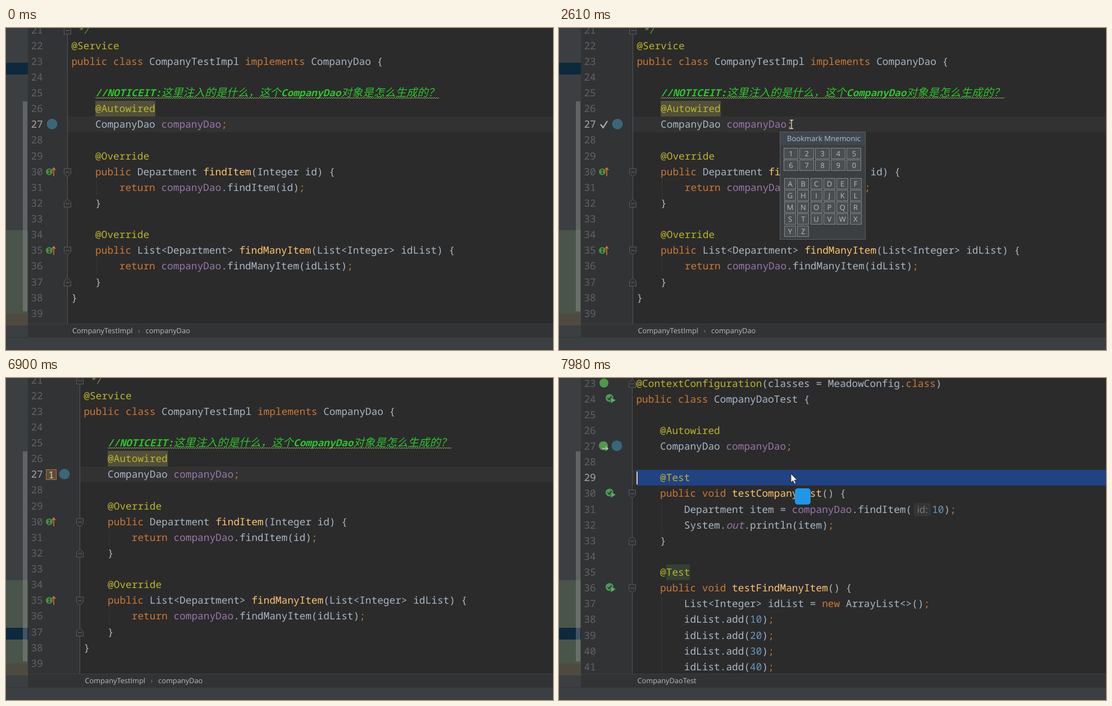
Write an HTML page that moves like this. It is 974 px wide and 575 px high and loops after 8 s.

```html
<!DOCTYPE html>
<html lang="zh">
<head>
<meta charset="utf-8">
<title>Editor bookmark</title>
<style>
html, body { margin: 0; width: 100%; height: 100%; overflow: hidden; background: #3c3f41; }
#stage { position: absolute; left: 0; top: 0; width: 974px; height: 575px; overflow: hidden; background: #3c3f41; text-rendering: geometricPrecision; }
#stage div, #stage svg { position: absolute; }
svg { left: 0; top: 0; overflow: visible; }
.file { left: 39px; top: 0; width: 935px; height: 528px; background: #2b2b2b; overflow: hidden; }
.origin { left: -39px; top: 0; width: 974px; height: 528px; }
.gutter { left: 39px; top: 0; height: 528px; background: #313335; border-right: 1px solid #555; }
.line, .num { height: 28px; white-space: pre; font: 17.8px/28px "Noto Sans Mono", monospace; color: #a9b7c6; }
.line { left: 116.4px; }
.num { left: 44.4px; color: #606366; }
.num.now { color: #a9a8a8; }
.row { left: 110px; width: 900px; height: 28px; background: #323232; }
.guide { width: 1px; background: #373737; }
.k { color: #cc7832; } .a { color: #bbb529; } .f { color: #9876aa; } .m { color: #ffc66d; } .n { color: #6897bb; }
.w { color: #bbb529; background: #52503a; display: inline-block; height: 28px; }
.t { color: #bbb529; background: #344134; display: inline-block; height: 28px; }
.selected .t { background: none; }
.d { color: #629755; font-style: italic; }
.o { color: #9876aa; font-style: italic; }
.c { color: #2bc52b; font-style: italic; font-weight: 600; }
.z { color: #2bc52b; font: italic 300 19.4px/20px "Noto Sans CJK SC", "Noto Sans CJK", sans-serif; }
.h { display: inline-block; box-sizing: border-box; width: 30px; height: 24px; margin: 2px 2px 2px 4px; vertical-align: top; border-radius: 4px; background: #343536; color: #7d7d7d; font: 17px/23px "Open Sans", sans-serif; text-align: center; }
.ui { white-space: pre; color: #bbb; font-family: "Open Sans", sans-serif; }
.caret { width: 2px; height: 23px; background: #d0d0d0; }
#crumbs { left: 39px; top: 528px; width: 935px; height: 24px; box-sizing: border-box; background: #313335; border-top: 1px solid #3e4042; }
#crumb { top: 528px; font-size: 12.8px; line-height: 24px; }
#crumb i { font-style: normal; color: #808080; margin: 0 9.6px; }
#popup { left: 393px; top: 185px; width: 151px; height: 191px; background: #3c3f41; border: 1px solid #5b5e60; }
#popup .title { left: 0; top: 0; width: 151px; height: 23px; background: #3d474f; text-indent: 4px; font-size: 13.1px; line-height: 22px; text-align: center; }
.key { box-sizing: border-box; height: 20px; border: 1px solid #85888a; background: #4a4e50; text-align: center; font-size: 13px; line-height: 18px; }
#badge { left: 71px; top: 163px; width: 17px; height: 17px; border: 1px solid #a27a4c; background: #614a33; color: #d0d0d0; font: 17px/17px "Noto Sans Mono", monospace; text-align: center; }
#lookup { left: 420px; top: 197px; width: 28px; height: 29px; border-radius: 5px; background: #2196e8; }
</style>
</head>
<body>
<div id="stage"></div>
<script>
const LOOP = 8000, PITCH = 28.13;
const stage = document.getElementById('stage');

function add(parent, cls, style = {}, html = '') {
  const el = document.createElement('div');
  el.className = cls;
  for (const [k, v] of Object.entries(style)) el.style[k] = typeof v === 'number' ? v + 'px' : v;
  el.innerHTML = html;
  parent.append(el);
  return el;
}
const svg = (parent, body) => add(parent, '', { left: 0, top: 0 }, `<svg width="1" height="1">${body}</svg>`);
const show = (el, on) => { el.style.display = on ? '' : 'none'; };

// «x text» gives the text the class x
const paint = s => s.replace(/</g, '&lt;').replace(/«(\w) (.*?)»/g, '<span class="$1">$2</span>');

const fold = (y, up) => `<path transform="translate(109.5 ${y}) scale(1 ${up ? -1 : 1})" d="M-6-6.5H6V2.5L0 8L-6 2.5Z" fill="#2f3133" stroke="#5c5e60"/><path d="M106.5 ${y}h6" stroke="#6a6c6e"/>`;
const dot = (x, y, r, color) => `<circle cx="${x}" cy="${y}" r="${r}" fill="${color}"/>`;
const implement = y => dot(77, y, 6, '#4a8f3c') +
  `<path d="M75 ${y - 3}h4m-2 0v6m-2 0h4" stroke="#233020" stroke-width="1.2" fill="none"/>` +
  `<path d="M85 ${y + 8}v-15m-3 4l3-4l3 4" stroke="#d9703f" stroke-width="1.6" fill="none"/>`;
const runTest = y => dot(90, y - 2, 7, '#4b9b57') +
  `<path d="M86.5 ${y - 2}l2.5 3l4.5-6" stroke="#313335" stroke-width="1.8" fill="none"/>` +
  `<path d="M92 ${y - 4}l9.5 6l-9.5 6z" fill="#5aae65" stroke="#313335"/>`;

function makeFile({ first, current, base, lines, folds, guides, shift, pinned }) {
  const root = add(stage, 'file');
  const origin = add(root, 'origin');
  const center = n => base + (n - current) * PITCH;
  const rowTop = Math.round(base) - 14;
  const gutter = add(origin, 'gutter');
  const layer = add(origin, '', { left: 0, top: 0, width: 974, height: 528 });
  add(layer, 'row', { top: rowTop });
  for (const [from, to] of guides)
    add(layer, 'guide', { left: 161, top: center(from) - 14, height: (to - from + 1) * PITCH });
  const selection = add(layer, 'row', { top: rowTop, left: 117, background: '#214283' });
  const rows = lines.map((text, i) => {
    const n = first + i, top = Math.round(center(n)) - 14;
    add(origin, n === current ? 'num now' : 'num', { top }, n);
    return add(layer, 'line', { top }, paint(text));
  });
  svg(layer, folds.map(n => fold(Math.round(center(Math.abs(n))) + .5, n < 0)).join(''));
  svg(origin, pinned(center));
  const caret = add(layer, 'caret', { top: rowTop + 3 });
  const setShift = s => {
    gutter.style.width = 70 + s + 'px';
    layer.style.transform = `translateX(${s}px)`;
  };
  setShift(shift);
  show(selection, false);
  return { root, layer, caret, selection, setShift, currentRow: rows[current - first] };
}

// Project strip
const strip = (top, height, color) => add(stage, '', { left: 0, top, width: 39, height, background: color });
strip(361, 149, '#49544a');
strip(510, 21, '#4f4a40');
const treeRow = strip(62, 21, '#0d293e');
add(stage, '', { left: 30, top: 131, width: 8, height: 375, background: 'rgba(166,166,166,.34)' });

const impl = makeFile({
  first: 21, current: 27, base: 172.3, shift: 0,
  folds: [-21, 30, -32, 35, -37], guides: [[31, 31], [36, 36]],
  pinned: y => implement(y(30)) + implement(y(35)),
  lines: [
    '«d  */»',
    '«a @Service»',
    '«k public class» CompanyTestImpl «k implements» CompanyDao {',
    '',
    '    «c //NOTICEIT:»«z 这里注入的是什么，这个»«c CompanyDao»«z 对象是怎么生成的？»',
    '    «w @Autowired»',
    '    CompanyDao «f companyDao»«k ;»',
    '',
    '    «a @Override»',
    '    «k public» Department «m findItem»(Integer id) {',
    '        «k return» «f companyDao».findItem(id)«k ;»',
    '    }',
    '',
    '    «a @Override»',
    '    «k public» List<Department> «m findManyItem»(List<Integer> idList) {',
    '        «k return» «f companyDao».findManyItem(idList)«k ;»',
    '    }',
    '}',
    ''
  ]
});
const wave = Array.from({ length: 307 }, (_, i) => `${159 + i * 2},${i % 2 ? 126 : 124}`).join(' ');
svg(impl.layer, dot(82, 171.5, 9.5, '#3a6678') + `<polyline points="${wave}" fill="none" stroke="#a39c68"/>`);
impl.caret.style.left = '393px';

const test = makeFile({
  first: 23, current: 29, base: 178.3, shift: 21,
  folds: [-23, 30, -33, 36], guides: [[31, 32], [37, 41]],
  pinned: y => dot(80, 9, 8, '#4f9a4a') + [24, 30, 36].map(n => runTest(y(n))).join('') +
    dot(79, 121, 8, '#4f9a4a') + '<path d="M77 126h10m-4-3.5l4 3.5l-4 3.5" stroke="#c4c8ca" stroke-width="1.6" fill="none"/>',
  lines: [
    '«a @ContextConfiguration»(classes = MeadowConfig.«k class»)',
    '«k public class» CompanyDaoTest {',
    '',
    '    «a @Autowired»',
    '    CompanyDao «f companyDao»«k ;»',
    '',
    '    «a @»«t Test»',
    '    «k public void» «m testCompanyTest»() {',
    '        Department item = «f companyDao».findItem(«h id:»«n 10»)«k ;»',
    '        System.«o out».println(item)«k ;»',
    '    }',
    '',
    '    «a @»«t Test»',
    '    «k public void» «m testFindManyItem»() {',
    '        List<Integer> idList = «k new» ArrayList<>()«k ;»',
    ...[10, 20, 30, 40].map(v => `        idList.add(«n ${v}»)«k ;»`)
  ]
});
svg(test.layer, dot(82, 121, 9.5, '#3a6678'));

// Breadcrumbs
add(stage, '').id = 'crumbs';
add(stage, '', { left: 0, top: 552, width: 974, height: 1, background: '#323435' });
const crumb = add(stage, 'ui');
crumb.id = 'crumb';
const trail = (...parts) => parts.join('<i>›</i>');

// Bookmark marks and popup
const check = svg(stage, '<path d="M74 172l4.5 6l7.5-12" fill="none" stroke="#afb1b3" stroke-width="2.2"/>');
const badge = add(stage, '', {}, '1');
badge.id = 'badge';
const popup = add(stage, '');
popup.id = 'popup';
add(popup, 'title ui', {}, 'Bookmark Mnemonic');
const keys = (chars, cols, left, top, width, dx) => [...chars].forEach((ch, i) =>
  add(popup, 'key ui', { left: left + i % cols * dx, top: top + Math.floor(i / cols) * 21.3, width }, ch));
keys('1234567890', 5, 6, 28, 26, 28.1);
keys('ABCDEFGHIJKLMNOPQRSTUVWXYZ', 6, 7, 81.5, 21, 23.3);
const lookup = add(stage, '');
lookup.id = 'lookup';

// Pointers
const beam = svg(stage, '<path d="M-3-7.5H3M0-7.5V7M-3 7.5H3" stroke="#e4e4e4" stroke-width="1.3" fill="none"/>');
const arrow = svg(stage, '<path d="M0 0V15.5L3.6 12.2L6.2 18L8.8 17L6.2 11.2H11Z" fill="#fff" stroke="#222" stroke-width=".9"/>');

// Each move: start, step length, number of steps, then points [progress, x, y]
const moves = [
  [130, 76, 10, [[0, 886, 549], [.2, 745, 420], [.4, 585, 300], [.6, 465, 220], [.8, 405, 184], [1, 414, 172]]],
  [1020, 70, 1, [[0, 420, 167], [1, 414, 172]]],
  [4990, 76, 10, [[0, 414, 172], [.2, 503, 150], [.4, 400, 128], [.7, 150, 102], [.9, 12, 92], [1, -40, 92]]],
  [7440, 67.5, 6, [[0, 17, 440], [.3, 160, 330], [.6, 330, 220], [1, 413, 171]]]
];
function pointerAt(t) {
  const move = moves.filter(m => t >= m[0]).pop();
  if (!move) return [-99, -99];
  const [start, step, count, points] = move;
  const u = Math.min(1, Math.floor((t - start) / step + 1e-6) / count);
  const i = Math.max(1, points.findIndex(p => p[0] >= u));
  const [p, q] = [points[i - 1], points[i]];
  const k = (u - p[0]) / (q[0] - p[0]);
  return [p[1] + (q[1] - p[1]) * k, p[2] + (q[2] - p[2]) * k];
}

const within = (t, ...spans) => spans.some(([a, b]) => t >= a && t < b);

function render(t) {
  const opened = t >= 2610, second = t >= 7170, selected = t >= 7912;
  show(impl.root, !second);
  show(test.root, second);
  impl.setShift(opened ? 22 : 0);
  show(impl.caret, within(t, [1020, 1480], [2010, 2540], [4200, 4730], [5260, 5745], [6230, 6760]));
  show(check, within(t, [2610, 4200]));
  show(popup, within(t, [2610, 4200]));
  show(badge, within(t, [4200, 7170]));
  treeRow.style.top = (t < 6830 ? 62 : 446) + 'px';

  show(test.selection, selected);
  test.currentRow.classList.toggle('selected', selected);
  test.caret.style.left = (selected ? 117 : 212) + 'px';
  show(lookup, t >= 7980);

  const text = selected ? 'CompanyDaoTest'
    : second ? trail('CompanyDaoTest', 'testCompanyTest()')
    : trail('CompanyTestImpl', 'companyDao');
  if (crumb.dataset.text !== text) {
    crumb.dataset.text = text;
    crumb.innerHTML = text;
  }
  crumb.style.left = (second ? 139.5 : opened ? 140.5 : 118) + 'px';

  const [x, y] = pointerAt(t);
  const plain = selected || y > 528 || x < (opened ? 131 : 109);
  show(beam, !plain);
  show(arrow, plain);
  (plain ? arrow : beam).style.transform = `translate(${x}px, ${y}px)`;
}

const begin = performance.now();
function tick() {
  render((performance.now() - begin) % LOOP);
  requestAnimationFrame(tick);
}
render(0);
requestAnimationFrame(tick);
</script>
</body>
</html>
```
